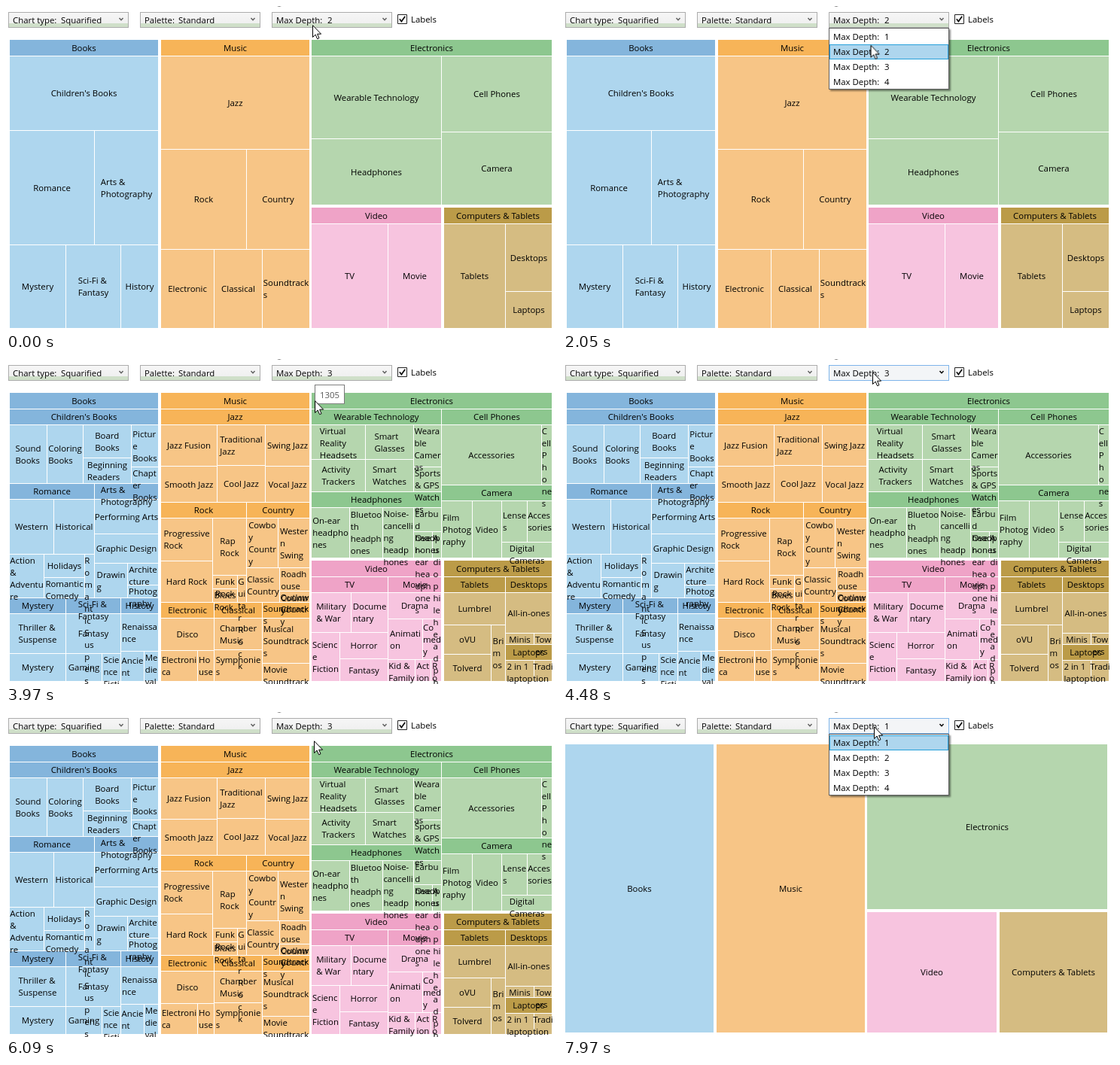
Animation of 732 by 432 pixels, one loop 8000 ms. Source, as an HTML page:

```html
<!DOCTYPE html>
<html lang="en">
<head>
<meta charset="utf-8">
<title>Treemap depth</title>
<style>
html, body { margin: 0; width: 100%; height: 100%; overflow: hidden; background: #fff; }
body { position: relative; font: 11.4px/16px "Open Sans", "Noto Sans", sans-serif; color: #000; }
div, span, svg { position: absolute; box-sizing: border-box; }
span { white-space: pre; }
#stage { left: 0; top: 0; width: 732px; height: 432px; overflow: hidden; }

.label { display: flex; justify-content: center; align-items: safe center; }
.label span { position: static; flex: none; }

.combo { top: 8px; width: 160px; height: 21px; border: 1px solid #acacac;
  background: linear-gradient(#f6f6f6 0, #f0f0f0 14px, #cfdfc9 14px); }
.combo.hot { border-color: #7eb4ea; background: #f3f5f7; }
.combo span { top: 2px; left: 5px; }
.combo svg { left: 145px; top: 5px; }
.chevron { fill: none; stroke: #606060; stroke-width: 1.5; }
.hot .chevron { stroke: #000; }

.popup { left: 353px; top: 29px; width: 172px; height: 92px; overflow: hidden; }
.list { left: 0; top: 0; width: 160px; height: 82px; background: #fff; border: 1px solid #5f5f5f;
  box-shadow: 2px 2px 2px rgba(0, 0, 0, .45); }
.list span { left: 5px; }
.list .num { left: 73px; }
.mark { left: 0; top: 1px; width: 158px; height: 20px; background: #aed6ee; border: 1px solid #26a0da; }

.tip { left: 0; top: -21px; width: 40px; height: 26px; background: #fff; border: 1px solid #767676;
  color: #575757; text-align: center; line-height: 25px; }

/* one loop is 8 s, so 1% is 80 ms */
.d1, .d2, .d3, .hot, .popup, .mark { animation: 8s step-end infinite; }
.list, .pointer, .tip { animation: 8s linear infinite; }
.d1 { animation-name: depth1; }
.d2 { animation-name: depth2; }
.d3 { animation-name: depth3; }
.hot { animation-name: hover; }
.popup { animation-name: open; }
.list { animation-name: slide; }
.mark { animation-name: mark; }
.pointer { animation-name: move; }
.tip { animation-name: tip; }
#chart .d1 { left: -2px; top: -2px; }

@keyframes depth1 { 0% { visibility: hidden } 76.5%, 100% { visibility: visible } }
@keyframes depth2 { 0% { visibility: visible } 38.25%, 100% { visibility: hidden } }
@keyframes depth3 { 0% { visibility: hidden } 38.25% { visibility: visible } 76.5%, 100% { visibility: hidden } }
@keyframes hover {
  0%, 24.1%, 68.4% { visibility: hidden }
  13.625%, 53.5%, 87.35%, 100% { visibility: visible }
}
@keyframes open {
  0%, 37%, 76.125% { visibility: hidden }
  14.5%, 58.5%, 97.75%, 100% { visibility: visible }
}
@keyframes slide {
  0%, 14.375%, 58.125%, 97.55% { transform: translateY(-82px) }
  16.22%, 58.1%, 60%, 97.5%, 99.5%, 100% { transform: none }
}
@keyframes mark {
  0%, 25.6% { transform: translateY(20px) }
  24%, 68.85%, 100% { transform: none }
  27.2% { transform: translateY(40px) }
}
@keyframes move {
  0%, 20.49% { transform: translate(407px, 25px) }
  20.5%, 23.75% { transform: translate(407px, 28px) }
  27.5%, 45.125% { transform: translate(410px, 75px) }
  49.625% { transform: translate(410px, 55px) }
  54.875% { transform: translate(412px, 20px) }
  56%, 63.74% { transform: translate(411px, 17px) }
  63.75%, 66.25% { transform: translate(411px, 19px) }
  70.375%, 84.75% { transform: translate(409px, 38px) }
  90.25%, 100% { transform: translate(413px, 19px) }
}
@keyframes tip { 0%, 39.5% { opacity: 0 } 41.375%, 51% { opacity: 1 } 51.01%, 100% { opacity: 0 } }
</style>
</head>
<body>
<div id="stage">
  <svg width="732" height="40" style="left:0;top:0" fill="none">
    <path d="M358.5 -1Q363 2 367.5 -1" stroke="#777"/>
    <path d="M520.5 11.5h12v12h-12z" stroke="#222"/>
    <path d="M522.8 17.3l2.6 3.2 4.8-6.8" stroke="#111" stroke-width="1.8"/>
  </svg>
  <span style="left:538px;top:10px">Labels</span>
  <div id="bar"></div>
  <div id="chart" style="left:0;top:0"></div>
  <div class="popup"><div class="list" id="list"><div class="mark"></div></div></div>
  <div class="pointer" style="left:0;top:0">
    <div class="tip">1305</div>
    <svg width="14" height="22" style="left:0;top:0">
      <path d="M.5 .7v15.8l3.6-3.5 2.5 5.7 2.4-1-2.4-5.5h5z" fill="#fff" stroke="#000"/>
    </svg>
  </div>
</div>
<script>
const $ = id => document.getElementById(id);

function add(parent, tag, cls, text, css) {
  const el = document.createElement(tag);
  if (cls) el.className = cls;
  if (text) el.textContent = text;
  Object.assign(el.style, css);
  parent.append(el);
  return el;
}

// Toolbar
function combo(x, label, valueX, value, cls = '') {
  const el = add($('bar'), 'div', 'combo ' + cls, '', { left: x + 'px' });
  add(el, 'span', '', label);
  add(el, 'span', '', value, { left: valueX - x - 1 + 'px' });
  el.insertAdjacentHTML('beforeend',
    '<svg width="10" height="8"><path class="chevron" d="M1.5 2l2.5 2.7L6.5 2"/></svg>');
}
combo(3, 'Chart type:', 73, 'Squarified');
combo(178, 'Palette:', 229, 'Standard');
combo(353, '', 427, '');
combo(353, '', 427, '', 'hot');
add($('bar'), 'span', '', 'Max Depth:', { left: '359px', top: '11px' });
for (const n of [1, 2, 3])
  add($('bar'), 'span', 'd' + n, String(n), { left: '427px', top: '11px' });

for (let i = 0; i < 4; i++) {
  const css = { top: 3 + 20 * i + 'px' };
  add($('list'), 'span', '', 'Max Depth:', css);
  add($('list'), 'span', 'num', String(i + 1), css);
}

// Treemap: groups hold a body; X and Y cut an area at a coordinate
const G = (name, body) => ({ name, body });
const X = (cut, a, b) => ({ axis: 0, cut, a, b });
const Y = (cut, a, b) => ({ axis: 1, cut, a, b });
const tall = word => [...word].join('|');

const books = G('Books', Y(165,
  G("Children's Books", X(54, 'Sound|Books', X(102, 'Coloring|Books', X(166,
    Y(131, 'Board|Books', 'Beginning|Readers'),
    Y(143, 'Pictur|e|Books', 'Chapt|er|Books'))))),
  Y(317,
    X(117,
      G('Romance', Y(259, X(63, 'Western', 'Historical'),
        X(50, 'Action|&|Adventu|re', X(104,
          Y(290, 'Holidays', 'Romantic|Comedy'),
          'R|o|m|a|nt|ic|S|us|p|en|s|e')))),
      G('Arts &|Photography', Y(232, 'Performing Arts', Y(271, 'Graphic Design',
        X(161, 'Drawin|g', Y(300, 'Archite|cture', 'Photog|raphy')))))),
    X(79, G('Mystery', Y(391, 'Thriller &|Suspense', 'Mystery')),
      X(152,
        G('Sci-Fi &|Fantasy', Y(391, 'Fantasy', X(127, 'Gaming', 'Scie|nce|Ficti|on'))),
        G('History', Y(388, 'Renaissa|nce', X(183, 'Ancie|nt', 'Me|die|val'))))))));

const music = G('Music', Y(190,
  G('Jazz', X(280, Y(142, 'Jazz Fusion', 'Smooth Jazz'),
    X(344, Y(141, 'Traditional|Jazz', 'Cool Jazz'), Y(142, 'Swing Jazz', 'Vocal Jazz')))),
  Y(323,
    X(319,
      G('Rock', X(274, Y(268, 'Progressive|Rock', 'Hard Rock'),
        Y(287, 'Rap|Rock', X(307, Y(305, 'Funk|Rock', 'Blues|Rock'), 'G|ui|ta|r|R|o|c|k')))),
      G('Country', Y(277, X(361, 'Cowbo|y|Countr|y', 'Wester|n|Swing'),
        X(363, 'Classic|Country', Y(308, 'Roadh|ouse|Countr|y', 'Outlaw|Countr|y'))))),
    X(276, G('Electronic', Y(387, 'Disco', X(254, 'Electroni|ca', 'Ho|use'))),
      X(340,
        G('Classical', Y(386, 'Chamber|Music', 'Symphonie|s')),
        G('Soundtrack|s', Y(404, 'Musical|Soundtrack|s', 'Movie|Soundtrack|s')))))));

const electronics = G('Electronics', X(578,
  Y(176,
    G('Wearable Technology', X(477,
      Y(133, 'Virtual|Reality|Headsets', 'Activity|Trackers'),
      X(541, Y(133, 'Smart|Glasses', 'Smart|Watches'),
        Y(143, 'Weara|ble|Camer|as', 'Sports|& GPS|Watch|es')))),
    G('Headphones', X(456, 'On-ear|headpho|nes', X(500, 'Bluetoo|th|headph|ones',
      X(541, 'Noise-|cancelli|ng|headp|hones', Y(229, 'Earbu|d|headp|hones',
        X(566, 'Ove|r-|ear|hea|dph|one|s', 'A|u|di|o|p|hi|le|' + tall('headphones')))))))),
  Y(167,
    G('Cell Phones', X(711, 'Accessories', 'C|ell|P|h|o|ne|s')),
    G('Camera', X(619, 'Film|Photog|raphy', X(658, 'Video',
      Y(243, X(692, 'Lense|s', 'Acces|sories'), 'Digital|Cameras')))))));

const video = G('Video', X(507,
  G('TV', Y(363, X(458, 'Military|& War', 'Docume|ntary'),
    X(443, 'Scienc|e|Fiction', Y(398, 'Horror', 'Fantasy')))),
  G('Movie', Y(345, 'Drama', Y(399, X(553, 'Animati|on', 'Co|med|y'),
    X(543, 'Kid &|Family', X(564, 'Act|ion', tall('Romance'))))))));

const computers = G('Computers & Tablets', X(663,
  G('Tablets', Y(353, 'Lumbrel', X(644, Y(392, 'oVU', 'Tolverd'), 'Bri|m|os'))),
  Y(379,
    G('Desktops', Y(364, 'All-in-ones', X(701, 'Minis', 'Tow|ers'))),
    G('Laptops', X(701, '2 in 1|laptop', 'Tradi|tion|al')))));

const roots = [
  { node: books, box: [4, 44, 202, 428], head: '#84b5dc', fill: '#aed6ee' },
  { node: music, box: [205, 44, 403, 428], head: '#f7b458', fill: '#f7c586' },
  { node: electronics, box: [405, 44, 725, 264], head: '#8dc78f', fill: '#b5d6ae' },
  { node: video, box: [405, 267, 578, 428], head: '#efa3c7', fill: '#f7c4df' },
  { node: computers, box: [581, 267, 725, 428], head: '#bb9b48', fill: '#d5bc82' }
];

function drawChart(max) {
  const chart = add($('chart'), 'div', 'd' + max);
  const cells = add(chart, 'div'), labels = add(chart, 'div');

  function cell([x0, y0, x1, y1], color, name) {
    const css = { left: x0 + 1 + 'px', top: y0 + 1 + 'px',
      width: x1 - x0 - 1 + 'px', height: y1 - y0 - 1 + 'px' };
    add(cells, 'div', '', '', { ...css, background: color });
    add(add(labels, 'div', 'label', '', css), 'span', '', name.replaceAll('|', '\n'));
  }

  function draw(node, box, level, root) {
    if (typeof node === 'string') return cell(box, root.fill, node);
    if (node.name) {
      if (level === max) return cell(box, root.fill, node.name);
      const [x0, y0, x1, y1] = box, y = y0 + (level === 1 ? 22 : 21);
      cell([x0, y0, x1, y], root.head, node.name);
      return draw(node.body, [x0, y, x1, y1], level + 1, root);
    }
    const a = [...box], b = [...box];
    a[node.axis + 2] = b[node.axis] = node.cut;
    draw(node.a, a, level, root);
    draw(node.b, b, level, root);
  }

  for (const root of roots) draw(root.node, root.box, 1, root);
}
[1, 2, 3].forEach(drawChart);
</script>
</body>
</html>
```
